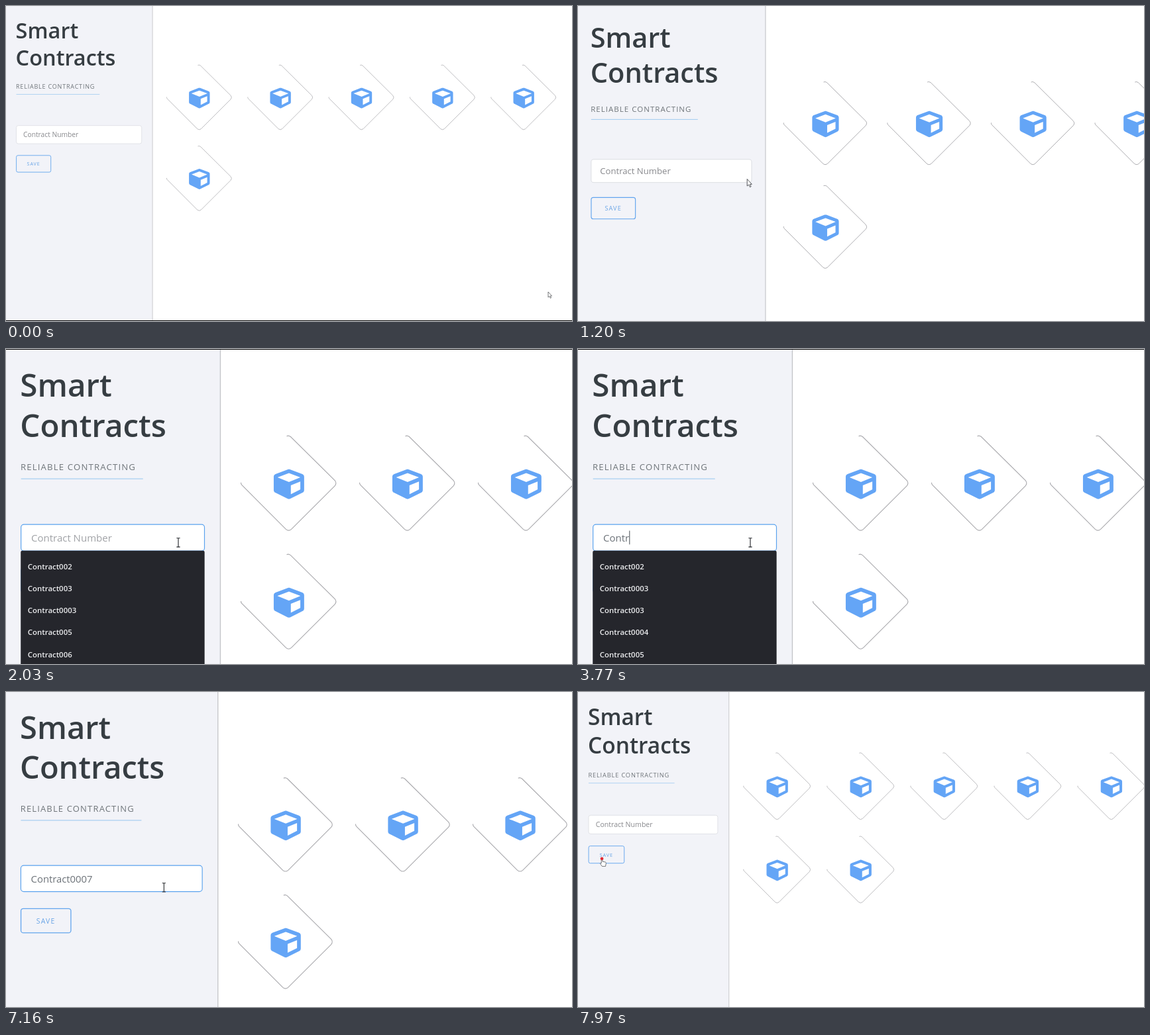
Recreate the animation shown at these times as an HTML page. Size 854x476 px, loop 8 s.

```html
<!DOCTYPE html>
<html lang="en">
<head>
<meta charset="utf-8">
<title>Smart Contracts</title>
<style>
  html, body { margin: 0; width: 100%; height: 100%; overflow: hidden; background: #fff; }
  svg { display: block; width: 854px; height: 476px; }
  text { font-family: "Open Sans", "Noto Sans", sans-serif; white-space: pre; }
  .title { font-size: 32.5px; font-weight: 600; fill: #363d42; }
  .subtitle { font-size: 9px; letter-spacing: .8px; fill: #6f757a; }
  .field { font-size: 10.27px; }
  .save { font-size: 7.2px; letter-spacing: .85px; fill: #68a4e6; }
  .option { font-size: 7.8px; font-weight: 600; fill: #ecedef; }
  .tile { fill: none; stroke: #a9a9ad; stroke-width: .75; }
  .cursor { fill: #fff; stroke: #33363a; stroke-width: .65; stroke-linejoin: round; }
</style>
</head>
<body>
<svg viewBox="0 0 854 476">
  <defs>
    <g id="block">
      <path class="tile" d="M-2 -48.6Q0 -49.6 2 -48L47.6 -2.8Q50 0 47.6 2.8L2.8 47.6Q0 50 -2.8 47.6L-48.2 2Q-49.6 .4 -49 -.6"/>
      <path fill="#64a5f6" fill-rule="evenodd" transform="translate(-15.4 -14.6) scale(.0613)"
        d="M239 6L31 84C12 91 0 109 0 129V354C0 373 10 389 27 397L235 501C248 508 264 508 277 501L485 397C502 389 512 373 512 354V129C512 109 500 91 481 84L273 6C262 2 250 2 239 6ZM256 68L448 140V142L256 220L64 142V140ZM288 424V275L448 210V344Z"/>
    </g>
  </defs>
  <g id="page">
    <rect x="-2" y="-2" width="860" height="480" fill="#fff"/>
    <rect x="-2" y="-2" width="222.8" height="480" fill="#f2f3f8"/>
    <rect x="220.6" y="-2" width=".9" height="480" fill="#c3c4c8"/>
    <text class="title" x="14.6" y="48.7">Smart</text>
    <text class="title" x="14.6" y="90.4">Contracts</text>
    <text class="subtitle" x="15" y="124.7">RELIABLE CONTRACTING</text>
    <rect x="15.5" y="133.2" width="125.8" height=".8" fill="#a3cdf1"/>
    <rect id="input" x="15.5" y="180.7" width="189.2" height="27.4" rx="3" fill="#fff" stroke-width=".8"/>
    <text id="value" class="field" x="26" y="198.3"></text>
    <rect id="caret" y="187.2" width=".75" height="14.2" fill="#555b60"/>
    <rect x="15.6" y="225.8" width="52.1" height="25.3" rx="2.4" fill="none" stroke="#62a5ee" stroke-width=".9"/>
    <text class="save" x="31.6" y="241.2">SAVE</text>
    <g id="blocks"></g>
    <g id="menu">
      <rect id="menuBox" x="15.2" y="207.8" width="189.6" rx="1.5" fill="#25262c"/>
    </g>
    <g id="cursor">
      <path id="arrow" class="cursor" d="M0 0V8.2L1.9 6.6 3.3 9.5 4.6 8.9 3.3 6.1H5.6Z"/>
      <path id="beam" fill="none" stroke="#222428" stroke-width=".75" d="M-1.8 -4.6H-.4L0 -4.2 .4 -4.6H1.8M0 -4.2V4.2M-1.8 4.6H-.4L0 4.2 .4 4.6H1.8"/>
      <path id="hand" class="cursor" d="M-.8 .6Q0 -.5 .9 .6V4.2L5 5Q6.2 5.4 6.1 6.6L5.3 11.2H.3L-2.4 7.4Q-2.6 6 -.8 6.7Z"/>
      <circle id="press" r="2.3" fill="#e02a34"/>
    </g>
  </g>
  <rect id="topEdge" width="854" height="1" fill="#000"/>
  <rect id="bottomEdge" y="475" width="854" height="1" fill="#000"/>
</svg>
<script>
const LOOP = 8000, ZOOM = 1.463, BLINK = 535;
const FOCUS = 1490, BLUR = 7850, ADDED = 7910;
const NAME = 'Contract0007';
const KEYS = [2650, 2750, 2950, 3610, 3770, 4300, 4860, 5060, 5320, 5450, 6110, 6470];

// [from time, number suffixes offered]
const MENUS = [
  [1590, ['002', '003', '0003', '005', '006']],
  [2650, ['002', '0003', '003', '0004', '005']],
  [6140, ['0003', '0004', '0005', '0006']],
  [6530, []]
];

// [time, x, y] in page units
const PATH = [
  [660, 818, 432], [1200, 199.4, 204], [1330, 186, 205], [1850, 186, 205],
  [2030, 177.7, 199.4], [7090, 177.7, 199.4], [7460, 43.3, 244.4], [7580, 35, 244.4]
];

const $ = id => document.getElementById(id);
const clamp = v => Math.max(0, Math.min(1, v));
const ramp = (t, from, to) => clamp((t - from) / (to - from));
const smooth = p => p * p * (3 - 2 * p);
const show = (id, on) => $(id).setAttribute('visibility', on ? 'visible' : 'hidden');
const set = (id, attrs) => {
  for (const key in attrs) $(id).setAttribute(key, attrs[key]);
};
function add(parent, tag, attrs) {
  const el = document.createElementNS('http://www.w3.org/2000/svg', tag);
  for (const key in attrs) el.setAttribute(key, attrs[key]);
  return $(parent).appendChild(el);
}

const blocks = Array.from({ length: 7 }, (_, i) => add('blocks', 'use', {
  href: '#block',
  transform: `translate(${291.5 + i % 5 * 122.35} ${138.1 + Math.floor(i / 5) * 122.4})`
}));
const options = Array.from({ length: 5 }, (_, i) =>
  add('menu', 'text', { class: 'option', x: 22.4, y: 226.9 + i * 22.73 }));

function cursorAt(t) {
  const i = PATH.findIndex(point => point[0] > t);
  if (i === 0) return PATH[0].slice(1);
  if (i < 0) return PATH[PATH.length - 1].slice(1);
  const [t0, x0, y0] = PATH[i - 1], [t1, x1, y1] = PATH[i];
  const p = smooth(ramp(t, t0, t1));
  return [x0 + (x1 - x0) * p, y0 + (y1 - y0) * p];
}

function drawField(t) {
  const typed = t < ADDED ? KEYS.filter(k => k <= t).length : 0;
  const focused = t >= FOCUS && t < BLUR;
  $('value').textContent = typed ? NAME.slice(0, typed) : 'Contract Number';
  set('value', { fill: typed ? '#6c7278' : focused ? '#a0a2a6' : '#88898d' });
  set('input', { stroke: focused ? '#5aa2ee' : '#dcdee2' });

  const since = t - (typed ? KEYS[typed - 1] : FOCUS);
  show('caret', focused && Math.floor(since / BLINK) % 2 === 0);
  set('caret', { x: 26 + (typed ? $('value').getComputedTextLength() : 0) });
}

function drawMenu(t) {
  const current = MENUS.filter(menu => menu[0] <= t).pop();
  const items = current ? current[1] : [];
  show('menuBox', items.length > 0);
  set('menuBox', { height: items.length === 5 ? 140 : 102.8 });
  options.forEach((el, i) => el.textContent = i < items.length ? 'Contract' + items[i] : '');
}

function drawCursor(t) {
  const [x, y] = cursorAt(t);
  const overButton = x < 67 && y > 226;
  const overInput = t > 1230 && y < 208;
  set('cursor', { transform: `translate(${x} ${y})` });
  show('hand', overButton);
  show('beam', overInput);
  show('arrow', !overButton && !overInput);
  show('press', t >= 1470 && t < 1620 || t >= BLUR);
}

function draw(t) {
  const zoom = ramp(t, 657, 1557) - ramp(t, 7129, 8030);
  set('page', { transform: `translate(0 ${.7 * zoom}) scale(${1 + (ZOOM - 1) * zoom})` });
  show('topEdge', zoom === 1);
  show('bottomEdge', zoom === 0);
  blocks[6].setAttribute('visibility', t >= ADDED ? 'visible' : 'hidden');
  drawField(t);
  drawMenu(t);
  drawCursor(t);
}

const start = performance.now();
function tick() {
  draw((performance.now() - start) % LOOP);
  requestAnimationFrame(tick);
}
tick();
</script>
</body>
</html>
```
